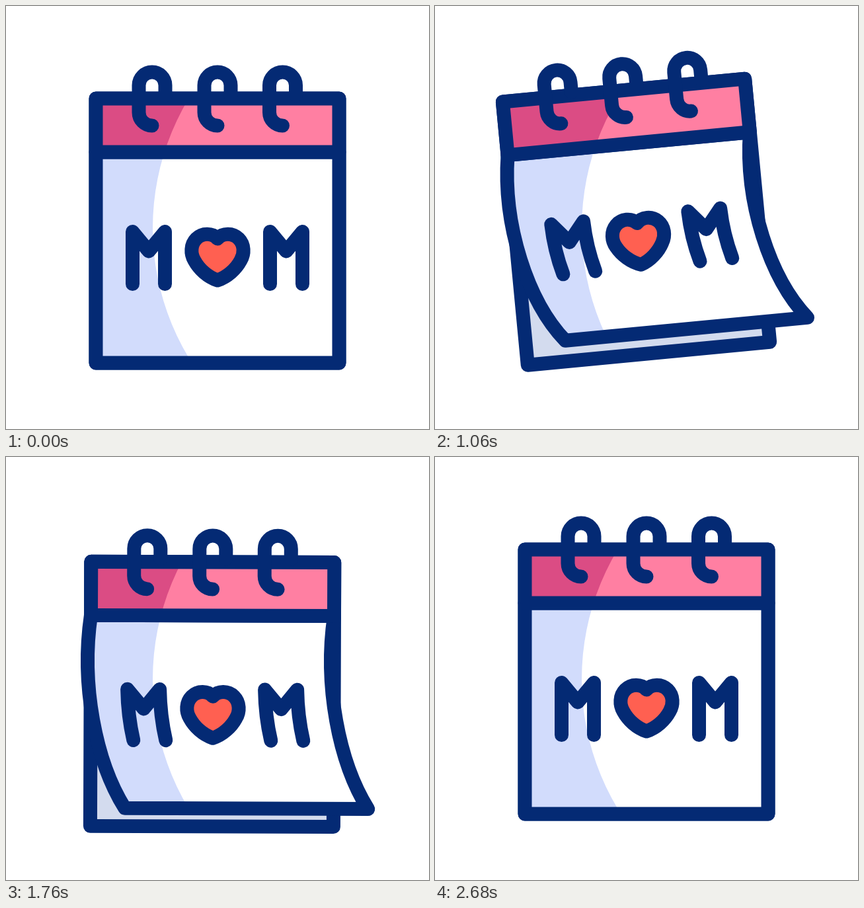
Recreate the animation shown at these times as an HTML page with a canvas. Size 640 px wide and 640 px high, loop 2.9 s.

```html
<!DOCTYPE html>
<html lang="en">
<head>
<meta charset="utf-8">
<title>Calendar</title>
<style>
  html, body { margin: 0; width: 100%; height: 100%; overflow: hidden; background: #fff; }
  canvas { display: block; width: 640px; height: 640px; }
</style>
</head>
<body>
<canvas id="stage" width="640" height="640"></canvas>
<script>
const ctx = document.getElementById('stage').getContext('2d');
const LOOP = 2900, LINE = 21;
const NAVY = '#042a74', PINK = '#ff7fa2', DARK_PINK = '#db4c84', BLUE = '#d2dcfc',
      BACK = '#d3dbee', RED = '#ff6051', YELLOW = '#ffcb50';

// Smooth track through [time, value] keys, flat at every extreme
function track(keys) {
  const slope = i => (keys[i + 1][1] - keys[i][1]) / (keys[i + 1][0] - keys[i][0]);
  const tangents = keys.map((_, i) => {
    if (i === 0 || i === keys.length - 1) return 0;
    const a = slope(i - 1), b = slope(i);
    return a * b > 0 ? 2 * a * b / (a + b) : 0;
  });
  return t => {
    const last = keys.length - 1;
    if (t <= keys[0][0]) return keys[0][1];
    if (t >= keys[last][0]) return keys[last][1];
    let i = 0;
    while (t > keys[i + 1][0]) i++;
    const [t0, v0] = keys[i], [t1, v1] = keys[i + 1];
    const d = t1 - t0, u = (t - t0) / d, w = 1 - u;
    return v0 * (1 + 2 * u) * w * w + v1 * (3 - 2 * u) * u * u
         + d * u * w * (tangents[i] * w - tangents[i + 1] * u);
  };
}

const shiftX = track([[0, 0], [400, -13], [540, -15.2], [700, -15.5], [1280, -15.5],
  [1500, -16.5], [1600, -16.3], [1920, 0]]);
const shiftY = track([[0, 0], [260, 47], [400, 28.5], [540, -3], [820, -9.5], [1080, -13.6],
  [1280, -16.5], [1480, -26], [1580, -24], [1620, -22.5], [1840, 34.6], [1940, 18.5], [2160, 0]]);
const tilt = track([[0, 0], [260, 2.1], [400, 1.45], [540, -2.9], [820, -4.5], [1080, -5.5],
  [1280, -6], [1600, -6], [1840, 2.3], [1940, 1.8], [2180, -2.4], [2680, 0]]);
const curl = track([[480, 0], [820, 0.45], [1080, 0.89], [1280, 1], [1560, 1.075],
  [1620, 1.06], [1940, 0.22], [2100, 0]]);

// Calendar shapes are centred on 0,0
const board = new Path2D('M-184 -200H184V200H-184Z');
const header = new Path2D('M-184 -200H184V-119H-184Z');
const heart = new Path2D('M0 12C-8 3 -23 3 -32 12C-41 21 -41 35 -35 45C-28 58 -15 70 0 75' +
  'C15 70 28 58 35 45C41 35 41 21 32 12C23 3 8 3 0 12Z');
const ring = new Path2D('M20 -205V-220A20 20 0 0 0 -20 -220V-179A20 20 0 0 0 0 -159');
const shade = new Path2D('M603 -45A381 381 0 0 0 603 717H0V-45Z');

function pagePath(k) {
  const side = x => [
    [x, -119],
    [x - 20 * k, -13 - 2 * k],
    [x + 10 * k, 93 + 12 * k],
    [x + 69 * k, 200 - 36 * k]
  ];
  const l = side(-184), r = side(184);
  return new Path2D(`M${l[0]}L${r[0]}C${r[1]} ${r[2]} ${r[3]}L${l[3]}C${l[2]} ${l[1]} ${l[0]}Z`);
}

function letterM(x, k) {
  const top = 1.5 - 11.5 * k, foot = 80.5 - 14 * k;
  const a = x - 24.5, b = x + 24.5;
  const bend = 41 - 11 * k;
  return new Path2D(`M${a + 12.5 * k} ${foot}Q${a + k} ${bend} ${a} ${top}` +
    `L${x + k / 2} ${31 - 11.5 * k}L${b} ${top}Q${b + k} ${bend} ${b + 12.5 * k} ${foot}`);
}

function place(t) {
  const a = tilt(t) * Math.PI / 180, c = Math.cos(a), s = Math.sin(a);
  ctx.setTransform(c, s, -s, c, 320 + shiftX(t), 340 + shiftY(t));
}

function fill(path, color) {
  ctx.fillStyle = color;
  ctx.fill(path);
}

function outline(path) {
  ctx.strokeStyle = NAVY;
  ctx.lineWidth = LINE;
  ctx.stroke(path);
}

// The shadow edge stays fixed on the stage while the paper moves under it
function paper(path, light, dark, t) {
  fill(path, light);
  ctx.save();
  ctx.resetTransform();
  ctx.clip(shade);
  place(t);
  fill(path, dark);
  ctx.restore();
  outline(path);
}

function rays(t) {
  const ramp = (from, to) => Math.min(1, Math.max(0, (t - from) / (to - from)));
  const head = ramp(1100, 1307), tail = ramp(1180, 1412), length = head - tail;
  if (length <= 0.01) return;
  ctx.strokeStyle = YELLOW;
  ctx.lineWidth = 18 * Math.min(1, length * 6);
  ctx.beginPath();
  for (const side of [-1, 1]) {
    for (const row of [-1, 0, 1]) {
      const x = u => side * (row ? 212 + 35 * u : 210 + 42 * u);
      const y = u => 39.5 + row * (26.5 + 19 * u);
      ctx.moveTo(x(tail), y(tail));
      ctx.lineTo(x(head), y(head));
    }
  }
  ctx.stroke();
}

function draw(t) {
  const k = curl(t);
  ctx.resetTransform();
  ctx.fillStyle = '#fff';
  ctx.fillRect(0, 0, 640, 640);
  ctx.lineJoin = ctx.lineCap = 'round';
  place(t);

  fill(board, BACK);
  outline(board);
  paper(pagePath(k), '#fff', BLUE, t);
  outline(letterM(-104, k));
  outline(letterM(104, k));

  ctx.save();
  ctx.translate(1.3 * k, -11.5 * k);
  fill(heart, RED);
  outline(heart);
  ctx.restore();

  paper(header, PINK, DARK_PINK, t);
  for (const x of [-99, 0, 98.5]) {
    ctx.save();
    ctx.translate(x, 0);
    outline(ring);
    ctx.restore();
  }
  rays(t);
}

const start = performance.now();
function tick() {
  draw((performance.now() - start) % LOOP);
  requestAnimationFrame(tick);
}
tick();
</script>
</body>
</html>
```
